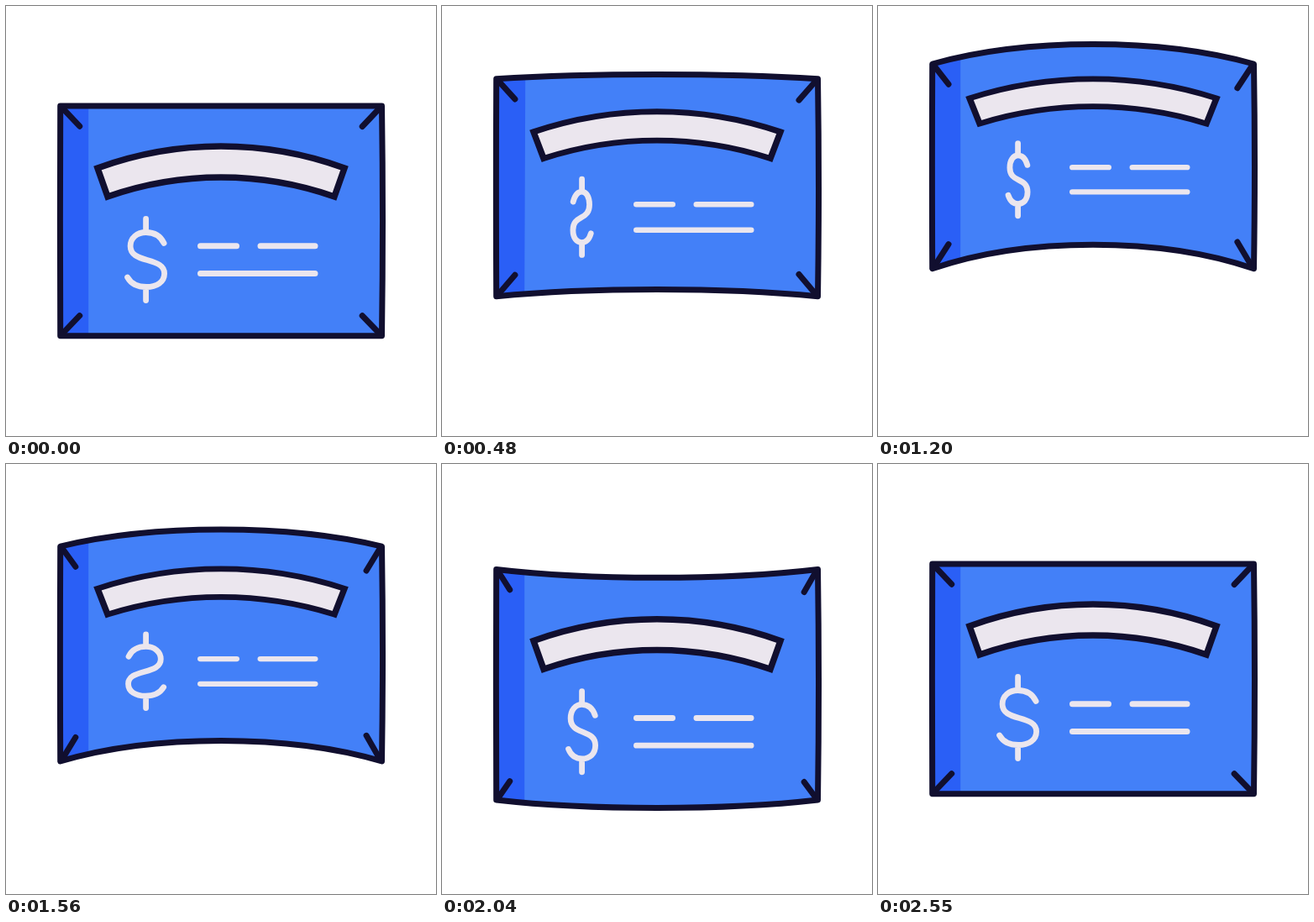
These frames come from a looping animation (512 by 512 pixels, 4580 ms). An HTML page:

```html
<!DOCTYPE html>
<html lang="en">
<head>
<meta charset="utf-8">
<title>Bouncing check</title>
<style>
  html, body { margin: 0; width: 100%; height: 100%; overflow: hidden; background: #fff; }
  svg { display: block; width: 100%; height: 100%; }
  .ink { fill: none; stroke: #110f2f; stroke-width: 7; stroke-linecap: round; stroke-linejoin: round; }
  .pale { fill: none; stroke: #ebe6ee; stroke-width: 7; stroke-linecap: round; stroke-linejoin: round; }
  #dollar path { vector-effect: non-scaling-stroke; stroke-width: 6.8px; }
</style>
</head>
<body>
<svg viewBox="0 0 512 512">
  <defs><clipPath id="clip"><path id="mask"/></clipPath></defs>
  <path id="face" fill="#4380f8"/>
  <path id="strip" fill="#2a5ff6" clip-path="url(#clip)"/>
  <path id="ticks" class="ink"/>
  <path id="edge" class="ink"/>
  <g id="content">
    <path d="M109 193A429 429 0 0 1 403 193L391 227A408 408 0 0 0 121 227Z"
      fill="#ebe6ee" stroke="#110f2f" stroke-width="7.5"/>
    <path class="pale" d="M231.5 285.7H274.5M303 285.7H368M231.5 318.6H368"/>
    <g id="dollar">
      <path class="pale" d="M0 253.5V269.5M0 334.5V350.5M21.5 282.5C17.5 274 9.5 269.5 0 269.5C-10.5 269.5 -18.5 276 -18.5 286C-18.5 296 -9.5 299.5 1.5 302.5C13.5 306 22 309 22 318.5C22 329 12.5 334.5 .5 334.5C-9.5 334.5 -17.5 331 -22 323"/>
    </g>
  </g>
</svg>
<script>
const LOOP = 4580, STEP = 30;
const PEAK = 1200, LAND = 2080, END = 2550;
const LEFT = 64.7, RIGHT = 447.5, TOP = 119, BOTTOM = 392.7, LINE_Y = 285.7;

const $ = id => document.getElementById(id);
const set = (id, name, value) => $(id).setAttribute(name, value);
const clamp = x => Math.max(0, Math.min(1, x));

// Cubic bezier easing with flat ends; a and b are the handles' x
function ease(x, [a, b]) {
  let lo = 0, hi = 1;
  for (let i = 0; i < 30; i++) {
    const s = (lo + hi) / 2, w = 1 - s;
    if (3 * w * w * s * a + 3 * w * s * s * b + s * s * s < x) lo = s; else hi = s;
  }
  return lo * lo * (3 - 2 * lo);
}

// From rest up to the peak, down to the landing, back to rest
function bounce(t, high, low, rise, fall) {
  const part = (from, to, handles) => ease(clamp((t - from) / (to - from)), handles);
  return high * part(0, PEAK, rise)
    + (low - high) * part(PEAK, LAND, fall)
    - low * part(LAND, END, [.2, .2]);
}

// Degrees turned: speed ramps up, holds, then ramps down to two full turns
function spin(t) {
  const speed = .416, up = 388, down = 2 * (END - up / 2 - 720 / speed);
  if (t < up) return speed * t * t / (2 * up);
  const left = Math.max(0, END - t);
  if (left < down) return 720 - speed * left * left / (2 * down);
  return speed * (t - up / 2);
}

function draw(t) {
  const drop = [.545, .367], edgeRise = [.285, .434], lateRise = [.6, .56];
  const lift = bounce(t, -93.5, 17, [.377, .318], drop);
  const squash = bounce(t, .112, .003, [.46, .15], [.69, .9]);
  const topMid = TOP + bounce(t, -73.5, 16.5, edgeRise, drop);
  const lowMid = BOTTOM + bounce(t, -108.5, 17, edgeRise, drop);
  const bend = bounce(t, 23.5, -11, lateRise, [.85, .85]);
  const inset = 23 + bounce(t, -3.7, -7, lateRise, drop);

  const lowBend = bend + 45 * squash;
  const topY = topMid + bend, lowY = lowMid + lowBend, midY = (topY + lowY) / 2;

  // Handles lie a third of the bend beyond the middle of each edge
  const shoulder = (RIGHT - LEFT) * .29;
  const x1 = LEFT + shoulder, x2 = RIGHT - shoulder;
  const topH = topMid - bend / 3, lowH = lowMid - lowBend / 3;
  const card = `M${LEFT} ${topY}C${x1} ${topH} ${x2} ${topH} ${RIGHT} ${topY}`
    + `Q${RIGHT + 2} ${midY} ${RIGHT} ${lowY}`
    + `C${x2} ${lowH} ${x1} ${lowH} ${LEFT} ${lowY}`
    + `Q${LEFT - .6} ${midY} ${LEFT} ${topY}Z`;
  for (const id of ['mask', 'face', 'edge']) set(id, 'd', card);

  const lean = 2.3 * Math.exp(-(((t - 700) / 250) ** 2));
  set('strip', 'd', `M50 0H${98.2 + lean}V${topY}L98.2 ${lowY}V512H50Z`);

  const tick = (x, y, dx, dy) =>
    `M${x + Math.sign(dx) * 2} ${y + Math.sign(dy) * 2}L${x + dx} ${y + dy}`;
  set('ticks', 'd',
    tick(LEFT, topY, inset, 24.2)
    + tick(RIGHT, topY, -inset - .3, 24.5 + (23 - inset) * .5 + bend * .1)
    + tick(LEFT, lowY, inset, -24 - lowBend * .18)
    + tick(RIGHT, lowY, -inset - .3, -24 - lowBend * .27));

  set('content', 'transform', `matrix(1 0 0 ${1 - squash} 0 ${LINE_Y * squash + lift})`);

  const turn = Math.cos(spin(t) * Math.PI / 180);
  set('dollar', 'transform', `translate(166.6 0) scale(${Math.abs(turn) < .01 ? .01 : turn} 1)`);
}

const start = performance.now();
function play() {
  const t = (performance.now() - start) % LOOP;
  draw(Math.min(END, Math.floor(t / STEP) * STEP));
  requestAnimationFrame(play);
}
play();
</script>
</body>
</html>
```
